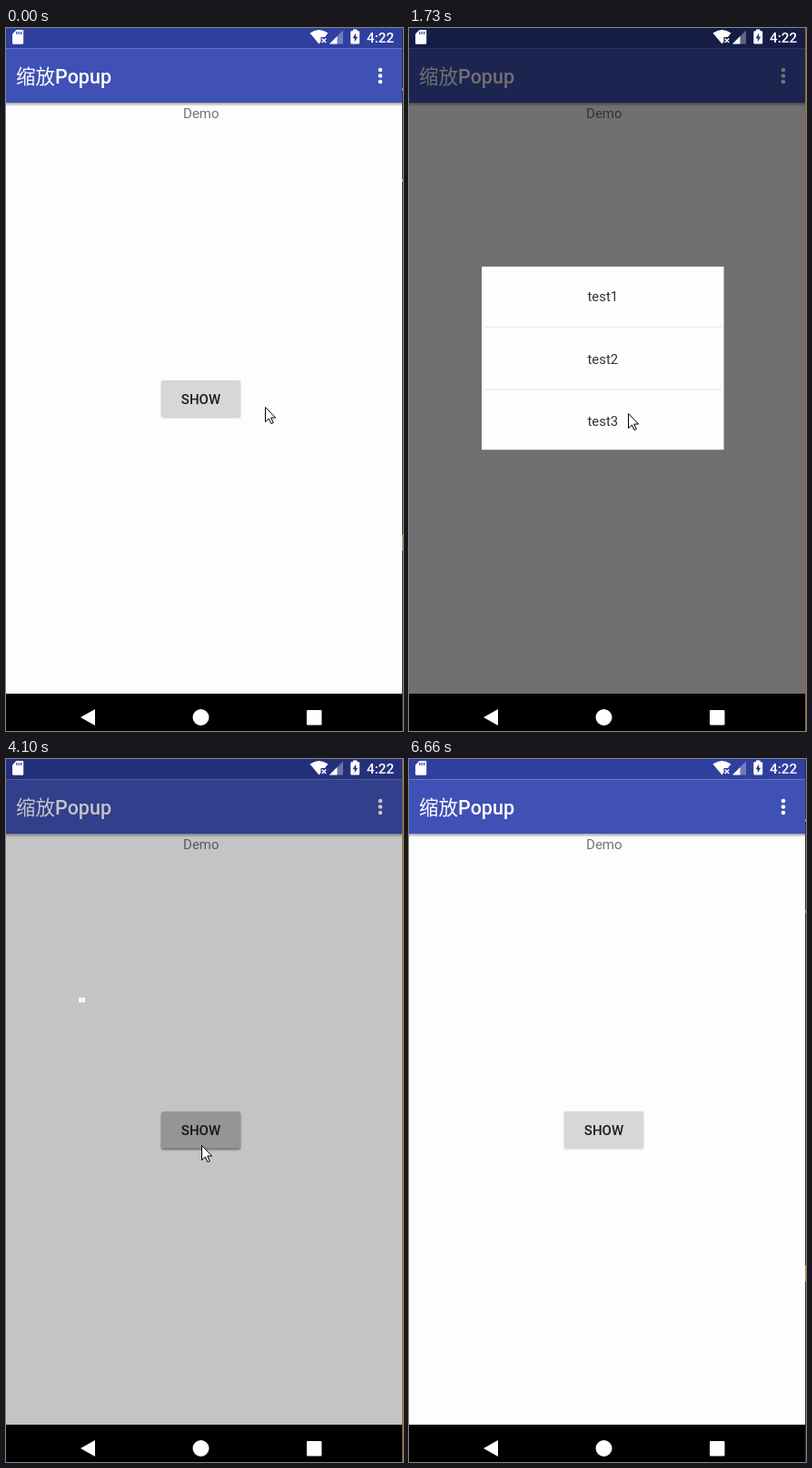
Write an HTML page that moves like this. It is 437 px wide and 772 px high and loops after 6750 ms.

```html
<!DOCTYPE html>
<html lang="zh">
<head>
<meta charset="utf-8">
<title>缩放Popup</title>
<style>
  html, body { margin: 0; width: 100%; height: 100%; overflow: hidden; background: #000; }
  svg { display: block; width: 437px; height: 772px; }
  text { font-family: Roboto, "Noto Sans CJK SC", "Noto Sans CJK", sans-serif; font-size: 15px; }
  .medium { font-weight: 500; }
  .mid { text-anchor: middle; }
</style>
</head>
<body>
<svg viewBox="0 0 437 772">
  <defs>
    <linearGradient id="fall" x1="0" y1="0" x2="0" y2="1">
      <stop offset="0" stop-color="#000" stop-opacity=".36"/>
      <stop offset="1" stop-color="#000" stop-opacity="0"/>
    </linearGradient>
    <filter id="soft" x="-20%" y="-20%" width="140%" height="140%">
      <feGaussianBlur stdDeviation="1"/>
    </filter>
  </defs>

  <!-- page -->
  <rect width="436" height="731" fill="#fdfdfd"/>
  <rect width="436" height="22.5" fill="#2f3f9e"/>
  <rect y="22.5" width="436" height="59.5" fill="#3f51b5"/>
  <rect y="82" width="436" height="4" fill="url(#fall)"/>
  <text x="11" y="61" fill="#fff" style="font-size:21.5px">缩放<tspan class="medium">Popup</tspan></text>
  <g fill="#fff">
    <circle cx="412" cy="46" r="2.3"/>
    <circle cx="412" cy="52.5" r="2.3"/>
    <circle cx="412" cy="59" r="2.3"/>
  </g>
  <text class="mid" x="214.8" y="99" fill="#747474">Demo</text>

  <!-- button -->
  <rect id="shade" x="171" y="388" width="87" height="40" rx="2" filter="url(#soft)"/>
  <rect x="171" y="387" width="87" height="40.5" rx="2" fill="#d6d8d7"/>
  <rect id="press" x="171" y="387" width="87" height="40.5" rx="2" opacity="0"/>
  <text class="mid medium" x="214.5" y="412.7" fill="#1d1d1d">SHOW</text>

  <rect id="dim" width="436" height="731" opacity="0"/>

  <!-- status icons -->
  <g fill="#fff">
    <path d="M11.5 2H18a1.2 1.2 0 0 1 1.2 1.2V16.500a1.200 1.200 0 0 1-1.200 1.200H8.200A1.200 1.200 0 0 1 7 16.500V6.500Z"/>
    <path d="M11.800 4v3M14.200 4v3M16.600 4v3" stroke="#2f3f9e" stroke-width="1.200"/>
    <path d="M334.500 5.500Q344.500-1.500 354.500 5.500L351 10H346.500V15L344.500 17.500Z"/>
    <path d="M347.700 11.500l4.600 4.600m0-4.600l-4.600 4.600" stroke="#fff" stroke-width="1.400"/>
    <path d="M356 17.500L371 2.500V17.500Z" opacity=".32"/>
    <path d="M356 17.500L364.500 9V17.500Z"/>
    <path d="M382 1.500h4.500v1.700H388a1.200 1.200 0 0 1 1.200 1.200V16.300a1.200 1.200 0 0 1-1.200 1.200H380.500a1.200 1.200 0 0 1-1.200-1.200V4.400a1.200 1.200 0 0 1 1.200-1.200H382Z"/>
    <path d="M385.200 5.500L381.600 11.200H383.800V15.300L387.200 9.700H385.200Z" fill="#26337f"/>
    <text class="medium" x="397" y="15.500" style="font-size:15.300px">4:22</text>
  </g>

  <!-- popup -->
  <g id="popup" visibility="hidden">
    <rect width="269" height="203" fill="#fefefe"/>
    <path d="M3 66.800H267M3 136.300H267" stroke="#e3e3e3"/>
    <g class="mid" fill="#333">
      <text x="134.500" y="38.500">test1</text>
      <text x="134.500" y="107.500">test2</text>
      <text x="134.500" y="176.500">test3</text>
    </g>
  </g>

  <!-- navigation bar -->
  <rect y="731" width="437" height="41"/>
  <g fill="#fff">
    <path d="M82 757L98 748V766Z"/>
    <circle cx="214.500" cy="757" r="9"/>
    <rect x="331" y="749" width="16.500" height="16.500" rx="1"/>
  </g>

  <!-- window edge -->
  <rect id="edge" x="436" width="1" height="772" fill="#303033"/>
  <path id="specks" d="M436.500 66v3M436.500 166v3M436.500 556v18" stroke="#b98a3c"/>

  <path id="cursor" d="M.5.5V16.500L4.300 13L7 18.500L9.300 17.500L6.800 12H11.700Z" fill="#fff" stroke="#000"/>
</svg>
<script>
const LOOP = 6750, DIM = 0.558, GROW = 412, DIM_TIME = 200;
const $ = id => document.getElementById(id);
const clamp = v => Math.min(1, Math.max(0, v));
const smooth = p => (1 - Math.cos(Math.PI * clamp(p))) / 2;

// press, dim start, growth start, dismissal
const shows = [
  { press: 1190, dim: 1303, grow: 1344, end: 3020 },
  { press: 3950, dim: 4020, grow: 4059, end: 5330 }
];

// start, end, target x, target y
const moves = [
  [680, 950, 241, 423],
  [1750, 1850, 266, 479],
  [1850, 1930, 271, 489],
  [2110, 2490, 215, 279],
  [2700, 2870, 237, 200],
  [3040, 3680, 215, 424],
  [4400, 4560, 244, 543],
  [5790, 6260, 344, 774]
];

function cursorAt(t) {
  let x = 285, y = 416;
  for (const [from, to, nx, ny] of moves) {
    if (t < from) break;
    const p = smooth((t - from) / (to - from));
    x += (nx - x) * p;
    y += (ny - y) * p;
  }
  return [Math.round(x), Math.round(y)];
}

function draw(t) {
  const show = shows.find(s => t >= s.press && t < s.end);
  const press = show ? clamp((t - show.press) / 120) : 0;
  const dim = show ? clamp((t - show.dim) / DIM_TIME) : 0;
  const scale = show ? smooth((t - show.grow) / GROW) : 0;
  const focus = t >= 1190 && t < 6660;

  $("press").setAttribute("opacity", 0.11 * press);
  $("shade").setAttribute("opacity", 0.25 + 0.25 * press);
  $("shade").setAttribute("transform", `translate(0 ${press})`);
  $("dim").setAttribute("opacity", DIM * dim);
  $("popup").setAttribute("visibility", scale > 0 ? "visible" : "hidden");
  $("popup").setAttribute("transform", `translate(80 262) scale(${scale})`);
  $("edge").setAttribute("fill", focus ? "#9c6420" : "#303033");
  $("specks").setAttribute("visibility", focus ? "hidden" : "visible");
  $("cursor").setAttribute("transform", `translate(${cursorAt(t)})`);
}

const start = performance.now();
function tick() {
  draw((performance.now() - start) % LOOP);
  requestAnimationFrame(tick);
}
tick();
</script>
</body>
</html>
```
